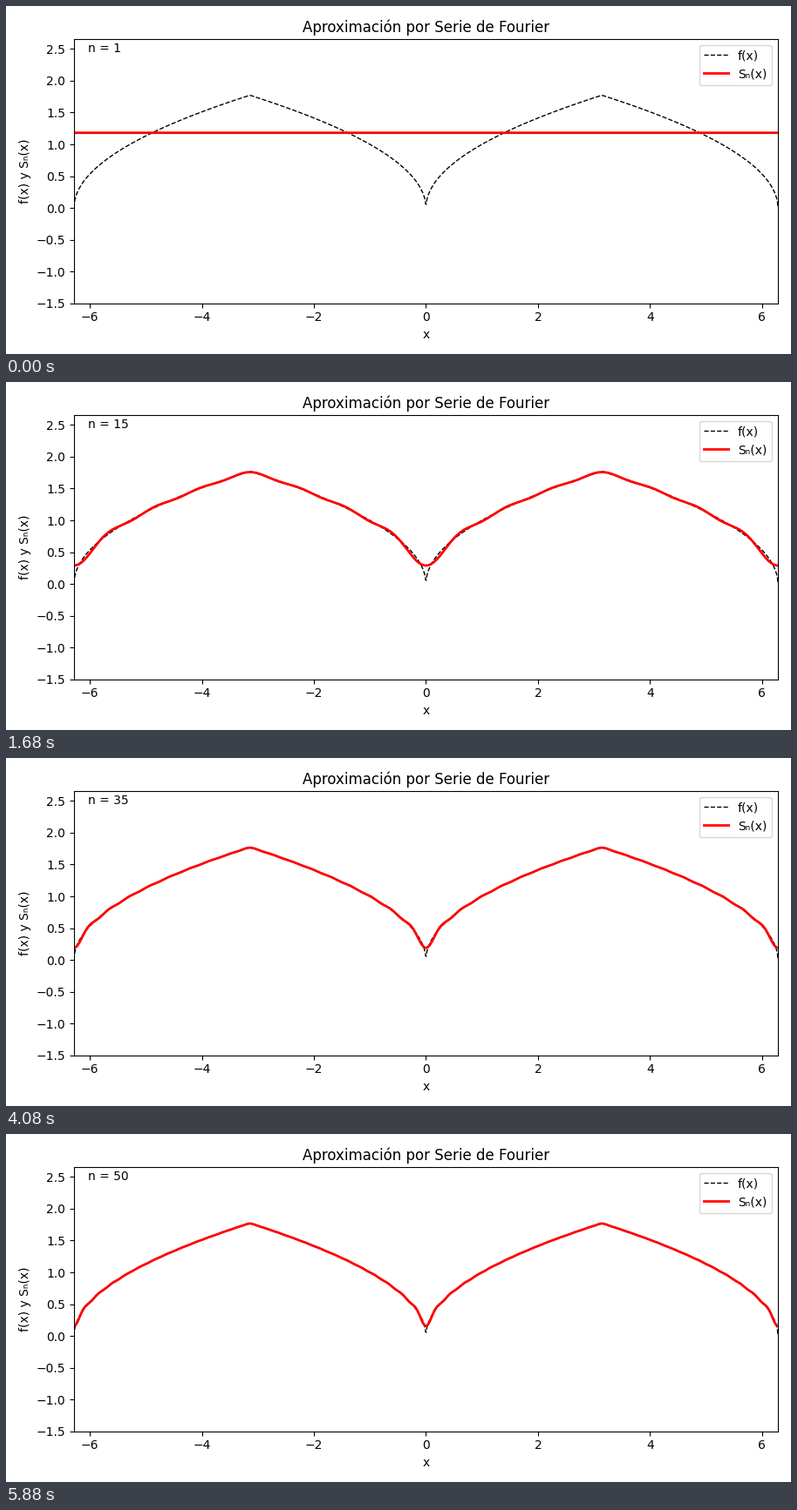
A matplotlib script for the animation above (6 s loop, 900 by 400 pixels).

```python
import numpy as np
import matplotlib.pyplot as plt
from matplotlib.animation import FuncAnimation

FRAMES, INTERVAL = 50, 120
SPAN = 2 * np.pi


def f(x):
    """Square root of the distance to the nearest multiple of 2*pi."""
    r = np.mod(x, SPAN)
    return np.sqrt(np.minimum(r, SPAN - r))


def cosine_coefficient(k, samples=8000):
    """(2/pi) * integral of sqrt(x) cos(kx) on [0, pi], with x = u**2."""
    top = np.sqrt(np.pi)
    u = (np.arange(samples) + 0.5) * top / samples
    return 2 / np.pi * np.sum(2 * u**2 * np.cos(k * u**2)) * top / samples


x = np.linspace(-SPAN, SPAN, 2000)
y = f(x)

# On a 4*pi period the odd harmonics vanish, so n terms hold n // 2 cosines.
partial_sums = [np.full_like(x, cosine_coefficient(0) / 2)]
for k in range(1, FRAMES // 2 + 1):
    partial_sums.append(partial_sums[-1] + cosine_coefficient(k) * np.cos(k * x))

fig, ax = plt.subplots(figsize=(9, 4), dpi=100)
ax.plot(x, y, "k--", lw=1, label="f(x)")
line, = ax.plot(x, partial_sums[0], "r", lw=2, label="Sₙ(x)")
counter = ax.text(0.02, 0.95, "", transform=ax.transAxes)
ax.set_xlim(-SPAN, SPAN)
ax.set_ylim(-1.5, 1.5 * y.max())
ax.set_title("Aproximación por Serie de Fourier")
ax.set_xlabel("x")
ax.set_ylabel("f(x) y Sₙ(x)")
ax.legend(loc="upper right")
fig.tight_layout()


def update(frame):
    n = frame + 1
    line.set_ydata(partial_sums[n // 2])
    counter.set_text(f"n = {n}")
    return line, counter


ani = FuncAnimation(fig, update, frames=FRAMES, interval=INTERVAL,
                    repeat=True, repeat_delay=0)
plt.show()
```
